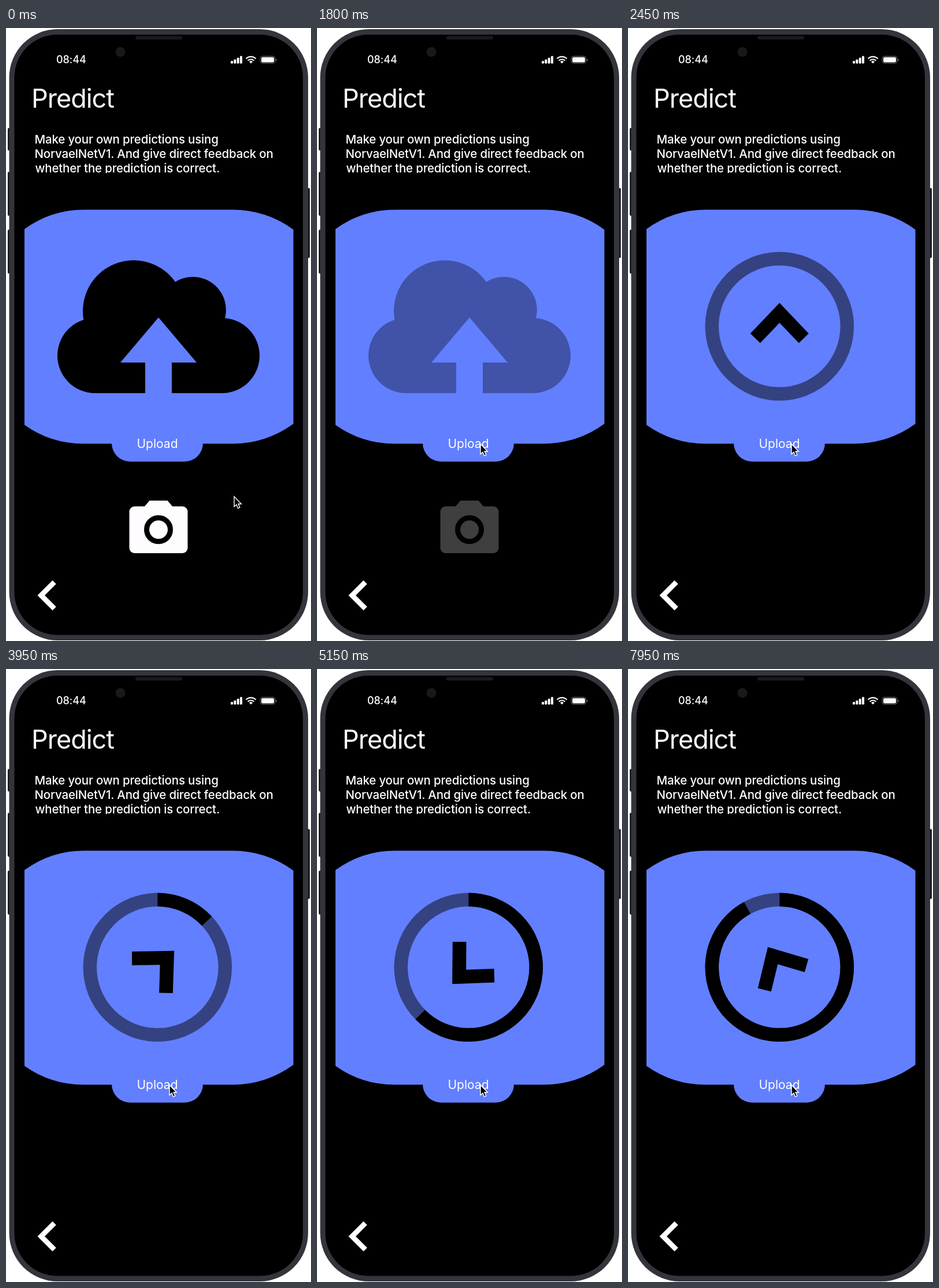
These frames come from a looping animation (528x1061 px, 8000 ms). An HTML page:

```html
<!DOCTYPE html>
<html lang="en">
<head>
<meta charset="utf-8">
<title>Predict</title>
<style>
  html, body { margin: 0; width: 100%; height: 100%; overflow: hidden; background: #fff; }
  svg { display: block; width: 100%; height: 100%; }
  text { font-family: Inter, "Open Sans", sans-serif; font-optical-sizing: none; fill: #fff; }
  .title { font-size: 45px; letter-spacing: -1px; }
  .intro { font-size: 20.5px; font-weight: 450; letter-spacing: -.19px; }
  .blue { fill: #627fff; }
</style>
</head>
<body>
<svg viewBox="0 0 528 1061">
  <defs>
    <clipPath id="introBox"><rect x="40" y="175" width="440" height="76"/></clipPath>
  </defs>

  <!-- phone -->
  <g fill="#1b1a20">
    <rect x="3" y="173" width="6" height="39" rx="2"/>
    <rect x="3" y="249" width="6" height="76" rx="2"/>
    <rect x="3" y="349" width="6" height="76" rx="2"/>
    <rect x="520" y="277" width="6" height="121" rx="2"/>
  </g>
  <rect x="5.5" y="2" width="517.5" height="1058" rx="84" fill="#34343c"/>
  <rect x="14.5" y="11.5" width="499.5" height="1039" rx="74"/>
  <rect x="224" y="14" width="81" height="6" rx="3" fill="#1a191b"/>
  <circle cx="198" cy="41.5" r="8.5" fill="#1a181a"/>

  <!-- status bar -->
  <text x="87" y="61" font-size="18" font-weight="500" letter-spacing="-.05">08:44</text>
  <g fill="#fff">
    <rect x="389" y="57" width="4" height="4.5" rx="1"/>
    <rect x="394.3" y="54.5" width="4" height="7" rx="1"/>
    <rect x="399.7" y="51.5" width="4" height="10" rx="1"/>
    <rect x="405" y="48.5" width="4" height="13" rx="1"/>
    <path d="M424 61.5l-3-3.2a4.4 4.4 0 0 1 6 0z"/>
    <rect x="442" y="50.5" width="22" height="9" rx="2.5"/>
    <path d="M467.3 53a2.5 2.5 0 0 1 0 4.5z" opacity=".5"/>
  </g>
  <g fill="none" stroke="#fff">
    <path d="M415.5 53.2a12 12 0 0 1 17 0M418.6 56.5a7.6 7.6 0 0 1 10.8 0" stroke-width="2.2"/>
    <rect x="440.2" y="48.9" width="25.6" height="12.2" rx="4" opacity=".45"/>
  </g>

  <text class="title" x="44" y="138">Predict</text>
  <g class="intro" clip-path="url(#introBox)">
    <text x="49.5" y="200">Make your own predictions using</text>
    <text x="49.5" y="225">NorvaelNetV1. And give direct feedback on</text>
    <text x="50.5" y="250">whether the prediction is correct.</text>
  </g>

  <!-- upload button -->
  <path class="blue" d="M32 348A176 176 0 0 1 136 314.5H391A176 176 0 0 1 497.5 349V685A176 176 0 0 1 391 719.5H136A176 176 0 0 1 32 687Z"/>
  <rect class="blue" x="183" y="686" width="158" height="64.5" rx="32"/>
  <g id="cloud">
    <circle cx="221" cy="490" r="88"/>
    <circle cx="323.5" cy="488" r="57.3"/>
    <circle cx="154" cy="567" r="65"/>
    <circle cx="374" cy="567" r="65"/>
    <rect x="154" y="489" width="220" height="143"/>
    <path class="blue" d="M264 501L330 579H287V633H241V579H198Z"/>
  </g>

  <!-- progress -->
  <g id="loader" transform="translate(262.3 516.3)">
    <g fill="none" stroke-width="23.5">
      <circle r="117" stroke="#354281"/>
      <circle id="arc" r="117" stroke="#000" pathLength="360" transform="rotate(-90)"/>
    </g>
    <path id="arrow" d="M0-40.5L50.5 12.5L33.5 29L0-6L-33.5 29L-50.5 12.5Z"/>
  </g>
  <text x="262" y="726.5" font-size="21" text-anchor="middle">Upload</text>

  <g id="camera" fill="#fffcff">
    <path d="M239 829L248.5 818H279.5L289 829Z"/>
    <rect x="213.5" y="828" width="101" height="81" rx="9"/>
    <circle cx="264" cy="868.3" r="20.5" stroke="#000" stroke-width="9"/>
  </g>
  <path d="M54.5 982l26-26l6.3 6.3L67 982l19.8 19.7l-6.3 6.3Z" fill="#fff"/>
  <path id="cursor" d="M0 0V17.5L4 14L6.6 20.4L9.8 19L7.1 12.8H12.3Z" stroke="#fff" stroke-width="1.4"/>
</svg>
<script>
const LOOP = 8000;
const $ = id => document.getElementById(id);
const cloud = $('cloud'), camera = $('camera'), loader = $('loader');
const arc = $('arc'), arrow = $('arrow'), cursor = $('cursor');

const span = (t, from, to) => Math.min(1, Math.max(0, (t - from) / (to - from)));
const smooth = p => p * p * (3 - 2 * p);

// cubic-bezier(.28, .08, .28, 1), solved by bisection
function ease(p) {
  if (p <= 0 || p >= 1) return p;
  let lo = 0, hi = 1, u;
  for (let i = 0; i < 24; i++) {
    u = (lo + hi) / 2;
    if (.84 * u * (1 - u) + u ** 3 < p) lo = u; else hi = u;
  }
  return .24 * u * (1 - u) ** 2 + 3 * u * u * (1 - u) + u ** 3;
}

function draw(t) {
  const move = smooth(span(t, 60, 960));
  cursor.setAttribute('transform', `translate(${395 - 112 * move} ${811 - 91 * move})`);

  cloud.setAttribute('opacity', 1 - span(t, 1350, 2030));
  camera.setAttribute('opacity', 1 - span(t, 1350, 1950));
  loader.setAttribute('opacity', span(t, 2030, 2420));

  const first = ease(span(t, 2450, 3300)), second = ease(span(t, 3920, 7070));
  arc.setAttribute('stroke-dasharray', `${46 * first + 285.5 * second} 720`);
  arrow.setAttribute('transform', `rotate(${44.5 * first + 285.5 * second})`);
}

function tick() {
  draw(performance.now() % LOOP);
  requestAnimationFrame(tick);
}
tick();
</script>
</body>
</html>
```
